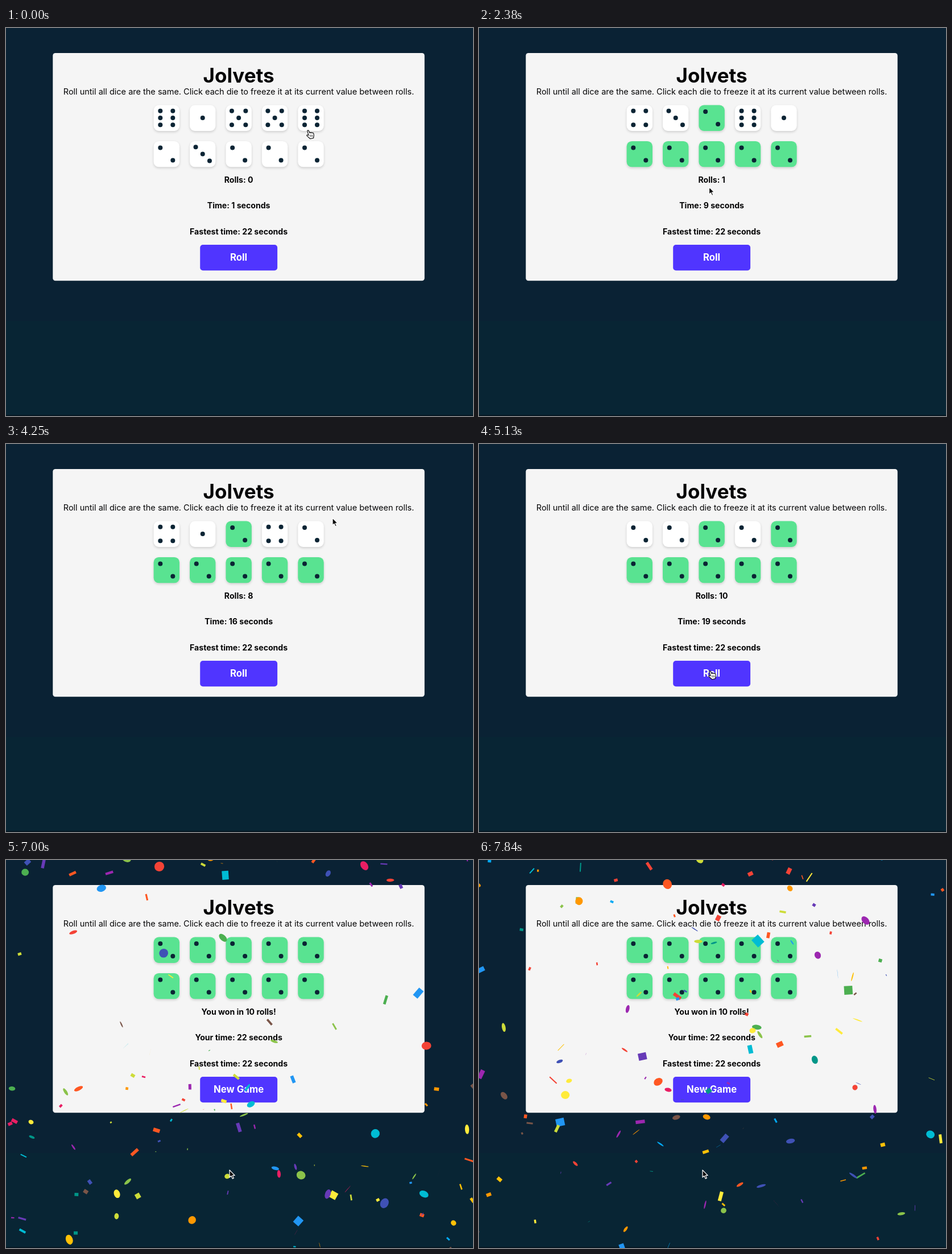
An HTML page with a canvas for the animation above (8.05 s loop, 821x682 px).

```html
<!DOCTYPE html>
<html lang="en">
<head>
<meta charset="utf-8">
<title>Dice game</title>
<style>
  html, body { margin: 0; width: 100%; height: 100%; overflow: hidden; background: #0a2234; }
  canvas { display: block; width: 821px; height: 682px; }
</style>
</head>
<body>
<canvas id="stage" width="821" height="682"></canvas>
<script>
const ctx = document.getElementById('stage').getContext('2d');
const W = 821, H = 682, LOOP = 8050, SCALE = 0.906;
const WIN = 5875, CONFETTI_START = 6031, TICKS_PER_MS = 0.232;
const INK = '#0b2434', FONT = 'Inter, sans-serif';

// [time, faces]; dice are numbered row by row
const rolls = [
  [0, '6155623222'], [1750, '4326122222'], [2500, '3426122222'], [2875, '1625322222'],
  [3375, '5321422222'], [3500, '6424522222'], [3625, '1523622222'], [3750, '3326122222'],
  [3875, '4124222222'], [4875, '3521222222'], [5000, '2222222222']
];
// [time, die toggled]
const clicks = [
  [250, 9], [500, 8], [750, 7], [1000, 5], [1250, 2], [1375, 3], [1625, 3], [1625, 2],
  [2125, 6], [2250, 2], [4500, 4], [5375, 3], [5625, 1], [WIN, 0]
];
// [time, x, y] of the pointer tip
const pointerPath = [
  [0, 533, 180], [250, 538, 222], [500, 478, 222], [750, 412, 222], [1000, 285, 222],
  [1250, 410, 165], [1375, 470, 168], [1500, 484, 175], [1625, 418, 166], [1750, 399, 388],
  [2000, 399, 392], [2125, 348, 222], [2250, 408, 165], [2500, 401, 394], [4000, 401, 394],
  [4250, 574, 130], [4500, 540, 160], [4625, 540, 160], [4875, 408, 399], [5125, 408, 399],
  [5375, 472, 160], [5625, 345, 160], [WIN, 282, 160], [6125, 345, 390], [6250, 393, 545]
];

function seeded(seed) {
  return () => {
    seed = (seed + 0x6d2b79f5) | 0;
    let r = Math.imul(seed ^ (seed >>> 15), 1 | seed);
    r = (r + Math.imul(r ^ (r >>> 7), 61 | r)) ^ r;
    return ((r ^ (r >>> 14)) >>> 0) / 4294967296;
  };
}

const colors = ('#f44336 #e91e63 #9c27b0 #673ab7 #3f51b5 #2196f3 #03a9f4 #00bcd4 #009688 ' +
  '#4caf50 #8bc34a #cddc39 #ffeb3b #ffc107 #ff9800 #ff5722 #795548').split(' ');

// Sum of the decaying speeds over n ticks with 1% drag
const glide = n => (1 - 0.99 ** n) / 0.01;
const fallY = (p, n) => 10 * n + (p.vy - 10) * glide(n);

function makeConfetti(count, lastTick) {
  const random = seeded(42);
  const range = (a, b) => a + random() * (b - a);
  const pieces = [];
  for (let i = 0; i < count; i++) {
    for (let born = 50 * random() ** 1.5; born < lastTick;) {
      const p = {
        born, x: range(0, W / SCALE), vx: range(-4, 4), vy: range(-10, 0),
        w: range(5, 20), h: range(5, 20), radius: range(5, 10),
        angle: range(0, 2 * Math.PI), spin: range(-0.2, 0.2), flip: range(0, 2),
        shape: Math.floor(range(0, 3)), color: colors[Math.floor(range(0, colors.length))]
      };
      p.life = 150;
      while (fallY(p, p.life) < H / SCALE + 5) p.life++;
      pieces.push(p);
      born += p.life;
    }
  }
  return pieces;
}
const confetti = makeConfetti(220, 450);

function drawConfetti(tick) {
  for (const p of confetti) {
    const n = tick - p.born;
    if (n < 0 || n >= p.life) continue;
    const phase = (p.flip + n * 0.1) % 2;
    ctx.save();
    ctx.scale(SCALE, SCALE);
    ctx.translate(p.x + p.vx * glide(n), fallY(p, n));
    ctx.rotate(p.angle + p.spin * n);
    ctx.scale(1, phase < 1 ? phase : 2 - phase);
    ctx.fillStyle = p.color;
    if (p.shape === 0) disc(0, 0, p.radius);
    else if (p.shape === 1) ctx.fillRect(-p.w / 2, -p.h / 2, p.w, p.h);
    else ctx.fillRect(-p.w / 6, -p.h / 2, p.w / 3, p.h);
    ctx.restore();
  }
}

function disc(x, y, r) {
  ctx.beginPath();
  ctx.arc(x, y, r, 0, 2 * Math.PI);
  ctx.fill();
}

function box(x, y, w, h, r, color) {
  ctx.fillStyle = color;
  ctx.beginPath();
  ctx.roundRect(x, y, w, h, r);
  ctx.fill();
}

function label(text, y, size, weight = 700, color = '#050506') {
  ctx.font = `${weight} ${size}px ${FONT}`;
  ctx.textAlign = 'center';
  ctx.fillStyle = color;
  ctx.fillText(text, 409.1, y);
}

const dieCenter = i => [282.3 + (i % 5) * 63.42, i < 5 ? 158 : 221.4];

function pips(face) {
  const a = 12.2, b = 11;
  const spots = [];
  if (face === 2) spots.push([-b, -b], [b, b]);
  if (face === 3 || face === 5) spots.push([-a, -a], [a, a]);
  if (face === 5) spots.push([a, -a], [-a, a]);
  if (face % 2) spots.push([0, 0]);
  if (face === 4 || face === 6) for (const x of [-b, b]) spots.push([x, -a], [x, a]);
  if (face === 6) spots.push([-b, 0], [b, 0]);
  return spots;
}

function drawDie(i, face, held) {
  const [x, y] = dieCenter(i);
  ctx.save();
  ctx.shadowColor = 'rgba(0,0,0,0.16)';
  ctx.shadowBlur = 4;
  ctx.shadowOffsetY = 2;
  box(x - 22.7, y - 22.5, 45.4, 45.4, 9, held ? '#59e391' : '#fff');
  ctx.restore();
  ctx.fillStyle = INK;
  for (const [dx, dy] of pips(face)) disc(x + dx, y + dy, 4);
}

function pointerAt(time) {
  const next = pointerPath.findIndex(k => k[0] > time);
  if (next < 0) return pointerPath[pointerPath.length - 1].slice(1);
  const [t0, x0, y0] = pointerPath[next - 1];
  const [t1, x1, y1] = pointerPath[next];
  const f = (time - t0) / (t1 - t0);
  return [x0 + (x1 - x0) * f, y0 + (y1 - y0) * f];
}

function clickable(x, y) {
  if (x > 341 && x < 477 && y > 381 && y < 426) return true;
  return [...Array(10).keys()].some(i => {
    const [cx, cy] = dieCenter(i);
    return Math.abs(x - cx) < 23 && Math.abs(y - cy) < 23;
  });
}

const arrow = new Path2D('M0 0V14L3.2 11L5.6 16.4L8 15.4L5.7 10.2H10Z');
const hand = new Path2D('M-3.5 1.2C-3.6 -.4 -1.4 -.7 -.8 .8L1 5C1.6 3.7 3.2 3.8 3.6 4.8' +
  'C4.3 3.8 5.8 4 6.1 5C7 4.2 8.2 4.8 8.5 6.2C9.2 9 9.2 10.6 8.5 12.5L8.3 14.5L2 16' +
  'C-.2 14 -2.8 12 -4.3 10.2C-5.2 8.8 -3.6 8 -2.2 9L-1 9.6Z');

function drawPointer(x, y) {
  const shape = clickable(x, y) ? hand : arrow;
  ctx.save();
  ctx.translate(x, y);
  ctx.scale(0.92, 0.92);
  ctx.lineJoin = 'round';
  ctx.lineWidth = 1.3;
  ctx.fillStyle = shape === hand ? '#fff' : '#0a0a0a';
  ctx.strokeStyle = shape === hand ? '#111' : '#fff';
  ctx.fill(shape);
  ctx.stroke(shape);
  if (shape === hand) {
    ctx.lineWidth = 0.8;
    ctx.beginPath();
    for (const dx of [1.4, 3.6, 5.8]) {
      ctx.moveTo(dx, 8.3);
      ctx.lineTo(dx + 0.9, 12.3);
    }
    ctx.stroke();
  }
  ctx.restore();
}

// The picture advances eight times a second, with a longer hold before the last step
function stepTime(t) {
  if (t >= 7840) return 7750;
  const step = Math.floor(t / 250) * 2 + (t % 250 >= 130 ? 1 : 0);
  return Math.min(step, 61) * 125;
}

function drawBackdrop() {
  ctx.fillStyle = '#0a2234';
  ctx.fillRect(0, 0, W, H);
  ctx.fillStyle = '#082534';
  ctx.fillRect(0, 515, W, H - 515);
  ctx.fillStyle = '#061722';
  ctx.fillRect(0, 680, W, 2);
}

function draw(t) {
  const time = stepTime(t);
  const won = time >= WIN;
  const rollCount = rolls.filter(r => r[0] <= time).length - 1;
  const faces = rolls[rollCount][1];
  const held = new Array(10).fill(false);
  for (const [at, die] of clicks) if (at <= time) held[die] = !held[die];
  const seconds = Math.min(22, Math.floor(1.4 + time * 0.0036));

  drawBackdrop();
  box(82.3, 44, 653.5, 400.3, 4.5, '#f5f5f5');
  label('Jolvets', 96, 35);
  label('Roll until all dice are the same. Click each die to freeze it at its current value between rolls.',
    117, 14.5, 400);
  for (let i = 0; i < 10; i++) drawDie(i, +faces[i], held[i]);
  label(won ? `You won in ${rollCount} rolls!` : `Rolls: ${rollCount}`, 271.5, 14.1);
  label(`${won ? 'Your time' : 'Time'}: ${seconds} seconds`, 317, 14.1);
  label('Fastest time: 22 seconds', 362.5, 14.1);
  box(341.2, 381, 135.9, 45.3, 5, '#5035ff');
  label(won ? 'New Game' : 'Roll', 409.2, 16.7, 700, '#fff');

  if (time > CONFETTI_START) drawConfetti((time - CONFETTI_START) * TICKS_PER_MS);
  drawPointer(...pointerAt(time));
}

function frame() {
  draw(performance.now() % LOOP);
  requestAnimationFrame(frame);
}
frame();
</script>
</body>
</html>
```
